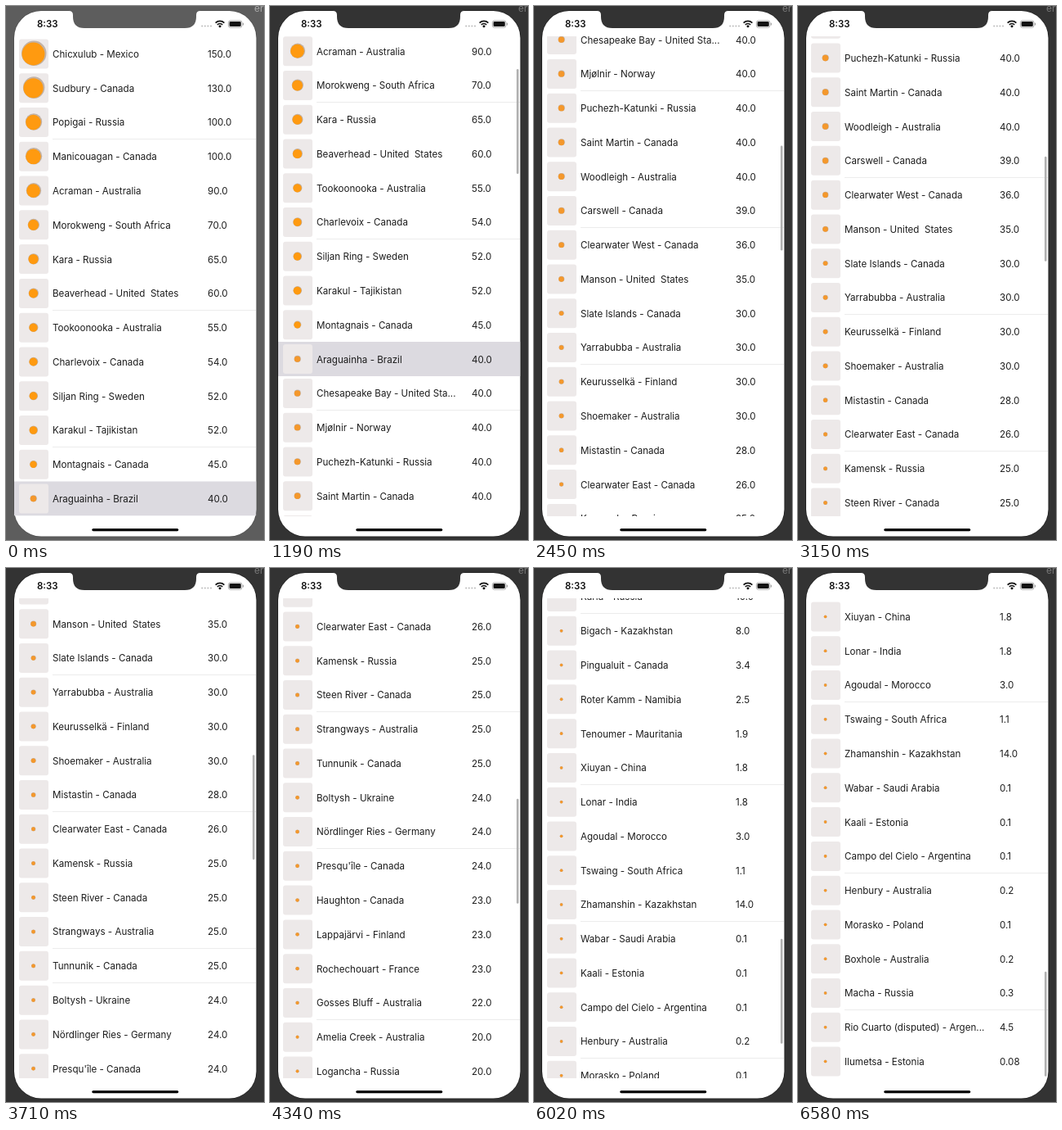
Recreate the animation shown at these times as an HTML page with a canvas. Size 316x652 px, loop 7420 ms.

```html
<!DOCTYPE html>
<html lang="en">
<head>
<meta charset="utf-8">
<title>Impact craters</title>
<style>
html, body { margin: 0; width: 100%; height: 100%; overflow: hidden; background: #333; }
canvas { display: block; width: 316px; height: 652px; }
</style>
</head>
<body>
<canvas id="stage" width="316" height="652"></canvas>
<script>
const LOOP = 7420, STEP = 70, PITCH = 41.77;
const FONT = 'Inter, Roboto, sans-serif';
const SELECTED = 13;
const ctx = document.getElementById('stage').getContext('2d');

const rows = `Chicxulub - Mexico|150.0
Sudbury - Canada|130.0
Popigai - Russia|100.0
Manicouagan - Canada|100.0
Acraman - Australia|90.0
Morokweng - South Africa|70.0
Kara - Russia|65.0
Beaverhead - United  States|60.0
Tookoonooka - Australia|55.0
Charlevoix - Canada|54.0
Siljan Ring - Sweden|52.0
Karakul - Tajikistan|52.0
Montagnais - Canada|45.0
Araguainha - Brazil|40.0
Chesapeake Bay - United Sta...|40.0
Mjølnir - Norway|40.0
Puchezh-Katunki - Russia|40.0
Saint Martin - Canada|40.0
Woodleigh - Australia|40.0
Carswell - Canada|39.0
Clearwater West - Canada|36.0
Manson - United  States|35.0
Slate Islands - Canada|30.0
Yarrabubba - Australia|30.0
Keurusselkä - Finland|30.0
Shoemaker - Australia|30.0
Mistastin - Canada|28.0
Clearwater East - Canada|26.0
Kamensk - Russia|25.0
Steen River - Canada|25.0
Strangways - Australia|25.0
Tunnunik - Canada|25.0
Boltysh - Ukraine|24.0
Nördlinger Ries - Germany|24.0
Presqu'île - Canada|24.0
Haughton - Canada|23.0
Lappajärvi - Finland|23.0
Rochechouart - France|23.0
Gosses Bluff - Australia|22.0
Amelia Creek - Australia|20.0
Logancha - Russia|20.0
Obolon' - Ukraine|20.0
Dhala - India|11.0
Bosumtwi - Ghana|10.0
Elgygytgyn - Russia|18.0
Karla - Russia|10.0
Bigach - Kazakhstan|8.0
Pingualuit - Canada|3.4
Roter Kamm - Namibia|2.5
Tenoumer - Mauritania|1.9
Xiuyan - China|1.8
Lonar - India|1.8
Agoudal - Morocco|3.0
Tswaing - South Africa|1.1
Zhamanshin - Kazakhstan|14.0
Wabar - Saudi Arabia|0.1
Kaali - Estonia|0.1
Campo del Cielo - Argentina|0.1
Henbury - Australia|0.2
Morasko - Poland|0.1
Boxhole - Australia|0.2
Macha - Russia|0.3
Rio Cuarto (disputed) - Argen...|4.5
Ilumetsa - Estonia|0.08`.split('\n').map(line => line.split('|'));

const drag = p => p ** 3 * (6 * p * p - 15 * p + 10);
const flick = p => 1 - (1 - p) ** 3;

const gestures = [
  { ease: drag, start: 700, time: 1180.5, distance: 495.62 },
  { ease: flick, start: 2310, time: 490, distance: 167.64 },
  { ease: flick, start: 3570, time: 770, distance: 451.57 },
  { ease: drag, start: 4820, time: 1763, distance: 972.67 }
];

function scrollAt(t) {
  return gestures.reduce((sum, g) => {
    const p = Math.min(1, Math.max(0, (t - g.start) / g.time));
    return sum + g.distance * g.ease(p);
  }, 0);
}

function rect(x, y, w, h, color, radius = 0) {
  ctx.fillStyle = color;
  ctx.beginPath();
  ctx.roundRect(x, y, w, h, radius);
  ctx.fill();
}

function disc(x, y, r, color) {
  ctx.fillStyle = color;
  ctx.beginPath();
  ctx.arc(x, y, r, 0, 7);
  ctx.fill();
}

function text(str, x, y, color = '#1c1c1c', font = '11.6px ') {
  ctx.fillStyle = color;
  ctx.font = font + FONT;
  ctx.fillText(str, x, y);
}

function drawRow([name, size], i, offset) {
  const y = 58.5 + i * PITCH - offset;
  if (y < 10 || y > 650) return;
  if (i === SELECTED) rect(10, y - 21, 296.5, PITCH, '#dcdae0');
  rect(16, y - 18, 36, 36, '#ede9e9', 3);
  const r = Math.max(1.9, size / 10);
  disc(33.5 + r * 0.05, y - r * 0.05, r * 1.02, '#c2b2a6');
  disc(33.5, y, r * 0.93, size > 40 ? '#ff9a10' : '#f4982c');
  const baseline = Math.round(y + 4.4);
  text(name, 57, baseline);
  text(size, 247, baseline);
  // Hairline separators only show where they land on the pixel grid.
  const edge = y + 20.9;
  if (edge % 1 > 0.76) rect(57, Math.floor(edge), 249, 1, '#ececec');
}

function drawStatus() {
  text('8:33', 38, 26, '#111', '600 11.5px ');
  for (let i = 0; i < 4; i++) disc(240.2 + i * 3.6, 24.5, 1, '#bbb');
  ctx.strokeStyle = '#111';
  ctx.lineWidth = 1.7;
  for (const r of [4.5, 7.6]) {
    ctx.beginPath();
    ctx.arc(262, 26, r, -Math.PI * 0.75, -Math.PI * 0.25);
    ctx.stroke();
  }
  disc(262, 24.8, 1.5, '#111');
  ctx.strokeStyle = '#999';
  ctx.lineWidth = 0.8;
  ctx.beginPath();
  ctx.roundRect(272.4, 17.9, 16.6, 8.4, 2.4);
  ctx.stroke();
  rect(273.6, 19.1, 14.2, 6, '#111', 1.4);
  rect(290, 20.6, 1, 3, '#999', 0.5);
}

function drawNotch(color) {
  ctx.fillStyle = color;
  ctx.fill(new Path2D('M77 5V6Q82 6 82 11V13Q82 27 96 27H219Q233 27 233 13V11Q233 6 238 6V5Z'));
}

function draw(t) {
  const offset = scrollAt(t), active = t >= 700;
  const bezel = active ? '#333' : '#5d5d5d';
  rect(0, 0, 316, 652, bezel);
  text('er', 304, 7, active ? '#777' : '#aaa', '12px ');
  rect(9.2, 5.2, 298.1, 643.1, active ? '#222' : '#505050', 34);
  rect(10, 6, 296.5, 641.5, '#fff', 33);

  ctx.save();
  ctx.beginPath();
  ctx.rect(10, 37, 296.5, 586);
  ctx.clip();
  rows.forEach((row, i) => drawRow(row, i, offset));
  if (active) rect(302, 40 + offset * 0.2169, 2.6, 128, '#b0b0b0', 1.3);
  ctx.restore();

  drawNotch(bezel);
  drawStatus();
  rect(105.3, 638, 106, 3.2, '#000', 1.6);
}

function tick(now) {
  draw(Math.floor(now % LOOP / STEP) * STEP);
  requestAnimationFrame(tick);
}
tick(performance.now());
</script>
</body>
</html>
```
